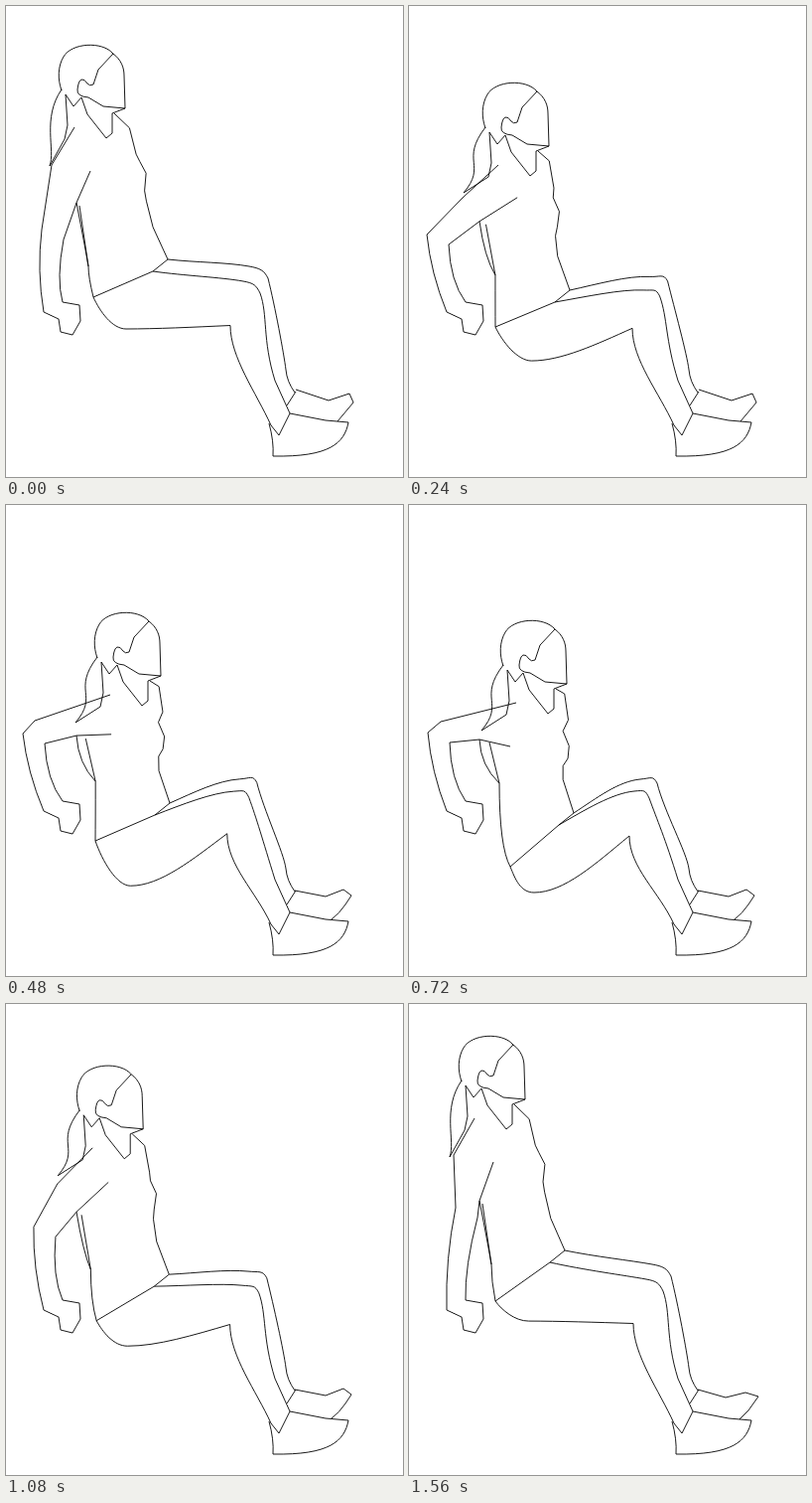
These frames come from a looping animation (400 px wide and 474 px high, 2160 ms). An HTML page:

```html
<!DOCTYPE html>
<html lang="en">
<head>
<meta charset="utf-8">
<title>Triceps dip</title>
<style>
html, body { margin: 0; width: 100%; height: 100%; overflow: hidden; background: #fff; }
svg { display: block; width: 100vw; height: 100vh; }
</style>
</head>
<body>
<svg viewBox="0 0 400 474">
  <g fill="none" stroke="#000" stroke-width=".9">
    <g id="head">
      <path d="M56 85C52 74 52 61 58 51C66 37 97 35 108 48C116 54 119 62 119 70L120 103L98 101L83 92Q71 91 72 84Q73 75 76 74Q79 73 82 78Q84 81 88 79L93 64L108 48"/>
      <path d="M60 89L68 101L76 92L82 109L101 133L107 128L107 108L120 103"/>
      <path id="tail"/>
    </g>
    <path id="arm"/>
    <path id="torso"/>
    <path id="legs"/>
    <path id="foot"/>
    <path d="M292 388L283 402M286 410L322 417L345 419C341 440 326 454 269 453Q270 438 265 420"/>
  </g>
</svg>
<script>
const STEP = 120, LOOP = 2160, LAST = 13;

// Joint positions at the key steps; everything else hangs off these
const KEYS = [0, 2, 4, 6, 8, 11, 13];
const JOINTS = {
  head: [[0, 0], [21, 38], [36, 69], [39, 77], [27, 40], [1, -6], [-3, -7]],
  shoulder: [[46, 160], [54, 193], [29, 217], [32, 218], [50, 199], [50, 146], [45, 152]],
  elbow: [[36, 225], [18, 230], [17, 230], [19, 229], [20, 230], [46, 210], [47, 205]],
  front: [[163, 255], [162, 286], [165, 300], [166, 310], [166, 284], [160, 252], [157, 248]],
  waist: [[88, 293], [87, 323], [90, 338], [102, 364], [94, 331], [87, 300], [87, 299]]
};

// Chest outline: [fraction from neck to hip, bulge], upright and lowered
const CHEST_UP = [[.1, 10], [.28, 7], [.33, 8], [.41, 10], [.53, 2], [.6, 0], [.78, -3]];
const CHEST_LOW = [[.04, 8], [.25, 8], [.34, 1], [.46, 5], [.56, 2], [.62, -4], [.73, -6]];

const WRIST = [38, 308], PALM = [57, 298], ANKLE = [267, 422];
const HAND = 'L53 315L55 328L67 331L75 317L74 301L57 298';
const FEET = [
  'M292 386L325 397L346 390L350 399L334 418',
  'M291 388L322 394L340 387L348 393L342 402Q336 411 328 417',
  'M291 388L319 396L339 391L352 395L342 409L333 418'
];

const lerp = (a, b, t) => a + (b - a) * t;
const mix = (p, q, t) => p.map((v, i) => lerp(v, q[i], t));
const add = (p, x, y) => [p[0] + x, p[1] + y];
const M = p => 'M' + p;
const L = (...ps) => ps.map(p => 'L' + p).join('');
const Q = (...ps) => 'Q' + ps.join(' ');
const C = (...ps) => 'C' + ps.join(' ');
const set = (id, name, value) => document.getElementById(id).setAttribute(name, value);

// Smooth motion through the keys, at rest at both ends
function track(rows, step) {
  const end = KEYS.length - 1;
  let k = 0;
  while (k < end - 1 && step >= KEYS[k + 1]) k++;
  const span = KEYS[k + 1] - KEYS[k], t = (step - KEYS[k]) / span;
  const speed = (i, c) => i === 0 || i === end ? 0
    : (rows[i + 1][c] - rows[i - 1][c]) / (KEYS[i + 1] - KEYS[i - 1]);
  return [0, 1].map(c =>
    lerp(rows[k][c], rows[k + 1][c], t * t * (3 - 2 * t)) +
    span * t * (1 - t) * ((1 - t) * speed(k, c) - t * speed(k + 1, c)));
}

function tail(s) {
  const tip = [44 - 10 * s, 161 - 11 * s];
  return M([56, 84]) + C([36 - 6 * s, 113 + 5 * s], [50 + 8 * s, 145 - 23 * s], tip) +
    M([60, 89]) + L([62, 120], [59, 134], tip);
}

function arm(j, pit, w) {
  const inner = add(j.elbow, 22, 10);
  const end = [85 + 80 * w - 63 * w * w, j.head[1] + 166 - 45 * w * (1 - w)];
  return M(add(j.head, 69, 122)) + L(j.shoulder, j.elbow) +
    Q(add(mix(j.elbow, WRIST, .5), -6, 0), WRIST) + HAND +
    Q(add(mix(PALM, inner, .5), -7, 8), inner) + L(pit, end);
}

function torso(j, pit, fold, w) {
  const neck = add(j.head, 109, 108);
  const chest = CHEST_UP.map((p, i) => {
    const [t, bulge] = mix(p, CHEST_LOW[i], w);
    return add(mix(neck, j.front, t), bulge, 0);
  });
  const small = [83 + 8 * w, 262 + 18 * w];
  return M(neck) + L(...chest, j.front, fold, j.waist) +
    M(add(pit, 3 + 7 * w, 3)) + L(small) + Q([small[0], j.waist[1] - 20], j.waist) +
    M(pit) + Q([80 - 8 * w, small[1] - 18], small);
}

function thigh(from, top, knee, w) {
  const slope = 4 - 6 * w;
  const lift = [lerp(from[0], top[0], .35), lerp(from[1], top[1], .45)];
  return M(from) + C(lift, add(top, -22, -slope), top) +
    C(add(top, 11, slope / 2), add(knee, -4, -8), knee);
}

function legs(j, fold, d, w) {
  const top = [245 - 12 * w * w, 262 + 28 * w - 14 * w * w];
  const knee = [264 - 14 * w * w, 274 + 6 * w];
  const nearKnee = add(knee, -8, 15);
  const crook = [226 - 4 * w * w, 321.5 + 11.5 * w * w];
  const seat = [121 + 5 * d, 325 + 65 * d];
  const dip = [lerp(j.waist[0], seat[0], .2), lerp(j.waist[1], seat[1], .45)];
  const under = [lerp(crook[0], seat[0], .36), lerp(crook[1], seat[1], .5)];
  return thigh(j.front, top, knee, w) +
    C(add(knee, 7, 28), [280, 350], [282, 366]) + Q([283, 378], [291, 389]) +
    thigh(fold, add(top, -6, 15 - 3 * w), nearKnee, w) +
    C(add(nearKnee, 8, 22), [258, 335], [271, 377]) + L([286, 410]) +
    M(j.waist) + C(dip, add(seat, -14, 0), seat) + C(add(seat, 30, 0), under, crook) +
    C(add(crook, 0, 32), [252, 389], ANKLE) + L([275, 432], [286, 410]);
}

function draw(step) {
  const j = {};
  for (const name in JOINTS) j[name] = track(JOINTS[name], step);
  const depth = j.head[1] / 77, w = Math.max(0, depth);
  const pit = [71, 198 + 38 * w], fold = add(j.front, -15, 12);

  set('head', 'transform', `translate(${j.head})`);
  set('tail', 'd', tail(Math.min(1, step / 2, (LAST - step) / 2)));
  set('arm', 'd', arm(j, pit, w));
  set('torso', 'd', torso(j, pit, fold, w));
  set('legs', 'd', legs(j, fold, depth, w));
  set('foot', 'd', FEET[step < 4 ? 0 : step < 10 ? 1 : 2]);
}

let start = null;
function tick(now) {
  if (start === null) start = now;
  draw(Math.min(LAST, Math.floor((now - start) % LOOP / STEP)));
  requestAnimationFrame(tick);
}
draw(0);
requestAnimationFrame(tick);
</script>
</body>
</html>
```
